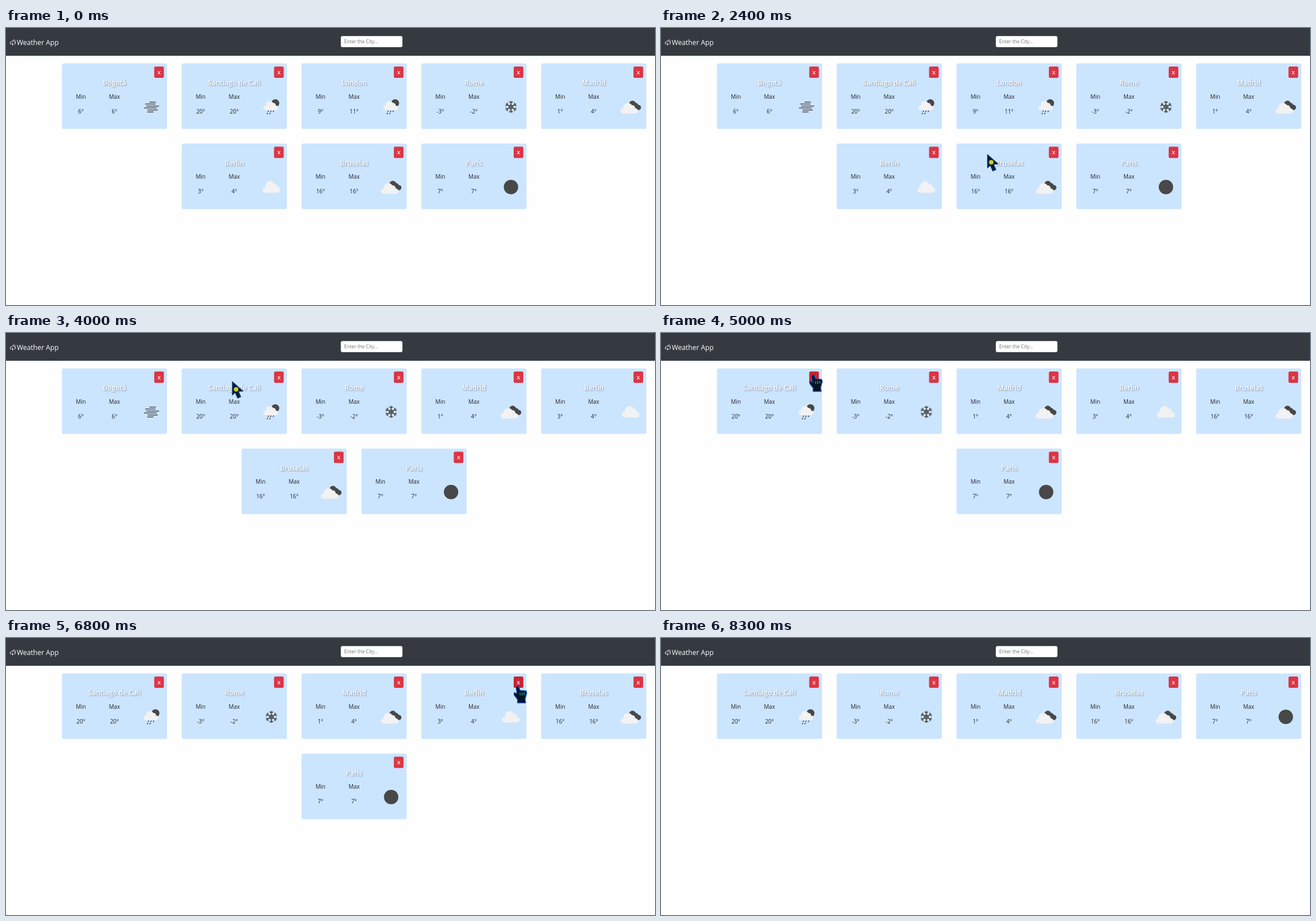
Write an HTML page that moves like this. It is 1144 px wide and 489 px high and loops after 9.3 s.

```html
<!DOCTYPE html>
<html lang="en">
<head>
<meta charset="utf-8">
<title>Weather App</title>
<style>
  html, body { margin: 0; width: 100%; height: 100%; overflow: hidden; background: #fefefe; }
  svg { display: block; }
  text { font: 9.9px "Open Sans", "Noto Sans", sans-serif; fill: #212529; }
  .mid { text-anchor: middle; }
  .brand { font-size: 12.2px; fill: #fff; }
  .hint { font-size: 8.5px; fill: #6c757d; }
  .city { font-size: 12.1px; font-weight: 600; fill: #fff;
          filter: drop-shadow(1.3px 1.3px 1.3px rgba(0, 0, 0, .42)); }
  .x { font-size: 9px; fill: #fff; font-weight: 600; }
  .dark { fill: #484848; }
  .light { fill: #f2f2f2; }
  .line { fill: none; stroke: #484848; stroke-linecap: round; stroke-width: 1.5; }
</style>
</head>
<body>
<svg id="stage" width="1144" height="489" viewBox="0 0 1144 489">
  <defs>
    <g id="cloud">
      <circle cx="-2.5" cy="-2.2" r="8"/>
      <circle cx="5" cy="-.5" r="5.5"/>
      <rect x="-15.5" width="31" height="10" y="0" rx="5"/>
    </g>
    <g id="overcast"><use href="#cloud" class="light"/></g>
    <g id="clouds">
      <g class="dark">
        <circle cx="3" cy="-5" r="6"/><circle cx="8.5" cy="-2" r="5"/><circle cx="13.5" cy="1" r="4.6"/>
      </g>
      <use href="#cloud" class="light" transform="translate(-2.6 2.5) scale(1 .92)"/>
    </g>
    <g id="rain">
      <circle class="dark" cx="7" cy="-6.5" r="7"/>
      <use href="#cloud" class="light" transform="translate(-.8 -2.2) scale(.84 .8)"/>
    </g>
    <g id="night"><circle class="dark" r="12.7"/></g>
    <g id="snow"></g>
    <g id="mist"></g>
    <g id="arrow">
      <path d="M1 1V24.5L6 20L10.4 30L15.8 27.6L11.7 18.2L19.6 17.6Z"
            fill="#071a30" stroke="#0b3f80" stroke-width="1.3" stroke-linejoin="round"/>
      <circle cx="7.6" cy="14.6" r="4" fill="#c9cb2c"/>
    </g>
    <g id="hand">
      <path d="M-2.5 2Q0-2 2.5 2L4 7L15 8L16 12L13 22L14 29H0V23L-6 15V11L-1 13Z"
            fill="#06121f" stroke="#0a46a4" stroke-width="1.5" stroke-linejoin="round"/>
      <path d="M4.4 11v5M8 10.5v5.5M11.6 10.5v5" fill="none" stroke="#18a9c8" stroke-width="1.3"/>
    </g>
  </defs>

  <rect width="1144" height="49" fill="#343a40"/>
  <g fill="none" stroke="#fff" stroke-linecap="round">
    <path d="M9 28.5a2 2 0 0 1 .5-4a2.8 2.8 0 0 1 5.2 0a2 2 0 0 1 .3 4M11.8 26.5l-1.2 2h2l-1.2 2"/>
    <path d="M12.5 21.4a2.4 2.4 0 0 1 3.6 3" stroke-width=".8"/>
  </g>
  <text class="brand" x="18.9" y="29.5">Weather App</text>
  <rect x="590.5" y="14.5" width="108" height="19" rx="2.5" fill="#fff" stroke="#ced4da"/>
  <text class="hint" x="596" y="27.4">Enter the City...</text>
</svg>
<script>
const LOOP = 9300, STEP = 100;
const PER_ROW = 5, PITCH_X = 211.2, PITCH_Y = 141.5, CENTER = 613.6, TOP = 62.5, CARD_W = 185.4;
const BTN = { x: 162.8, y: 5.5, width: 17, height: 20 };

// city, min, max, icon, time of removal
const cities = [
  ["Bogotá", 6, 6, "mist", 5000],
  ["Santiago de Cali", 20, 20, "rain"],
  ["London", 9, 11, "rain", 3400],
  ["Rome", -3, -2, "snow"],
  ["Madrid", 1, 4, "clouds"],
  ["Berlin", 3, 4, "overcast", 7300],
  ["Bruselas", 16, 16, "clouds"],
  ["Paris", 7, 7, "night"]
];

// close button of a column in the top row
const closeAt = (col, y = 82) => [CENTER + (col - 2) * PITCH_X + 77, y];

// start, end, points passed at an even pace; the pointer rests between trips
const trips = [
  [300, 400, [1117, 18], [856, 62]],
  [700, 800, [692, 100], [503, 172]],
  [1000, 1500, [494, 330], [404, 387], [706, 263], [563, 80]],
  [1600, 1900, [560, 120], [553, 263]],
  [2300, 3200, [560, 240], closeAt(2)],
  [3700, 3800, [560, 84], [414, 84]],
  [4000, 4700, [398, 85], [253, 80], closeAt(0, 74)],
  [5100, 5200, [276, 66], [284, 70]],
  [5600, 6100, [554, 245], [778, 122]],
  [6300, 7000, [800, 118], [913, 102], closeAt(3, 86), closeAt(3)],
  [7600, 7700, [800, 68], [701, 55]],
  [8000, 8100, [840, 70], [979, 82]]
];
const pointerShown = t => t >= 300 && t < 8300 && !(t >= 5300 && t < 5600);

const stage = document.getElementById("stage");

function add(parent, tag, attrs, text) {
  const el = document.createElementNS("http://www.w3.org/2000/svg", tag);
  for (const key in attrs) el.setAttribute(key, attrs[key]);
  if (text !== undefined) el.textContent = text;
  return parent.appendChild(el);
}

const stroke = (id, d, turn = 0) =>
  add(document.getElementById(id), "path", { class: "line", d, transform: `rotate(${turn})` });
const place = (el, x, y) => el.setAttribute("transform", `translate(${x} ${y})`);
const show = (el, on) => el.setAttribute("visibility", on ? "visible" : "hidden");

for (let i = 0; i < 6; i++) {
  stroke("snow", "M0 0V-10.2M-2.8-9L0-6.4L2.8-9M0-4L3.5-2", i * 60);
  const half = 5 + 6 * Math.sin(Math.PI * i / 5);
  const mid = i % 2 ? -2 : 2;
  stroke("mist", `M${mid - half} ${i * 3.5 - 8.5}h${half * 2}`);
}
for (let i = 0; i < 5; i++) {
  const row = Math.floor(i / 3);
  stroke("rain", `M${(i % 3) * 4.5 - 5 - row * 1.5} ${7 + row * 4}l-.9 1.5`);
}

function makeCard([name, min, max, icon, gone = Infinity]) {
  const el = add(stage, "g", {});
  const label = (x, y, text, cls = "") => add(el, "text", { x, y, class: "mid " + cls }, text);
  add(el, "rect", { width: CARD_W, height: 115.8, rx: 3, fill: "#cce5ff" });
  const btn = add(el, "rect", { ...BTN, rx: 2.5 });
  label(BTN.x + BTN.width / 2, 19, "X", "x");
  label(CARD_W / 2, 38.7, name, "city");
  [["Min", min, 33.5], ["Max", max, CARD_W / 2]].forEach(([title, value, x]) => {
    label(x, 62.3, title);
    label(x, 88.2, value + "°");
  });
  add(el, "use", { href: "#" + icon, x: 158, y: 76.8 });
  return { el, btn, gone };
}

const cards = cities.map(makeCard);
const arrow = add(stage, "use", { href: "#arrow" });
const hand = add(stage, "use", { href: "#hand" });

function pointerAt(t) {
  const [from, to, ...points] = trips.findLast(trip => trip[0] <= t) || trips[0];
  const k = Math.max(0, Math.min(1, (t - from) / (to - from))) * (points.length - 1);
  const i = Math.min(Math.floor(k), points.length - 2);
  const [x, y] = points[i].map((v, axis) => v + (points[i + 1][axis] - v) * (k - i));
  return { x, y };
}

function draw(now) {
  const t = Math.floor((now % LOOP) / STEP) * STEP;
  const p = pointerAt(t);
  const shown = pointerShown(t);
  const live = cards.filter(c => t < c.gone);
  let over = false;

  cards.forEach(c => c.el.setAttribute("display", t < c.gone ? "inline" : "none"));
  live.forEach((c, i) => {
    const row = Math.floor(i / PER_ROW);
    const count = Math.min(PER_ROW, live.length - row * PER_ROW);
    const x = CENTER - CARD_W / 2 + (i % PER_ROW - (count - 1) / 2) * PITCH_X;
    const y = TOP + row * PITCH_Y;
    const dx = p.x - x - BTN.x, dy = p.y - y - BTN.y;
    const hover = shown && dx >= 0 && dx <= BTN.width && dy >= 0 && dy <= BTN.height;
    const pressed = hover && t >= c.gone - STEP;
    over = over || hover;
    place(c.el, x, y);
    c.btn.setAttribute("fill", pressed ? "#bd2130" : hover ? "#c82333" : "#dc3545");
  });

  place(arrow, p.x, p.y);
  place(hand, p.x, p.y);
  show(arrow, shown && !over);
  show(hand, over);
}

function tick() {
  draw(performance.now());
  requestAnimationFrame(tick);
}
tick();
</script>
</body>
</html>
```
